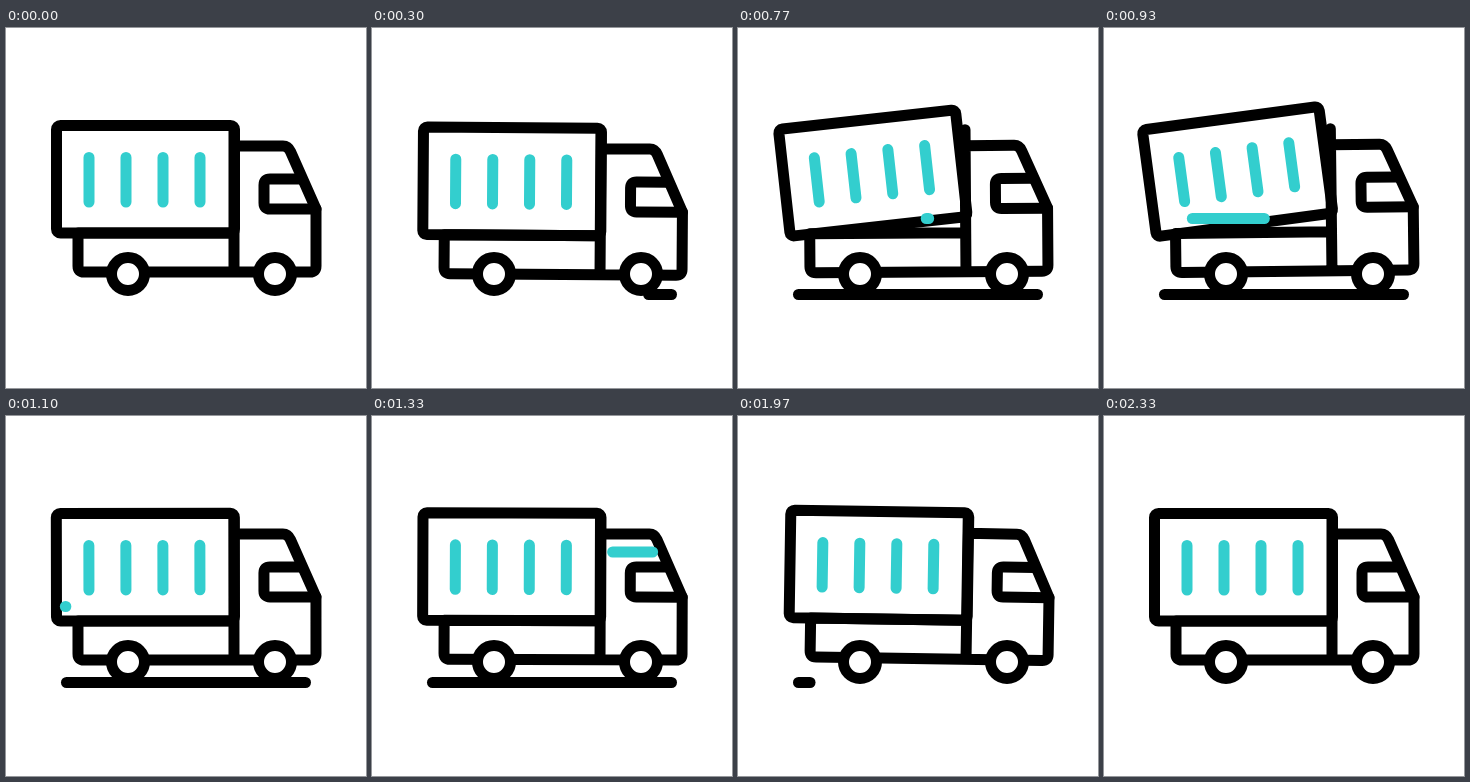
Animation of 360x360 px, one loop 2500 ms. Source, as an HTML page:

```html
<!DOCTYPE html>
<html lang="en">
<head>
<meta charset="utf-8">
<title>Delivery truck</title>
<style>
  html, body { margin: 0; width: 100%; height: 100%; overflow: hidden; background: #fff; }
  svg { display: block; width: 100vw; height: 100vh; }
  svg * { stroke-linecap: round; stroke-linejoin: round; }
  svg { fill: none; stroke: #000; stroke-width: 11; }
  .accent { stroke: #33cece; }
  .wheel { fill: #fff; }
</style>
</head>
<body>
<svg viewBox="0 0 360 360">
  <path id="ground"/>
  <g id="body">
    <path d="M228 102V244M72 205H228M72 205V238Q72 244 78 244H304Q310 244 310 238V181L284.500 123.500Q282 118 277 118H228"/>
    <path d="M295 151H264Q258 151 258 157V175Q258 181 264 181H310"/>
    <g id="box">
      <rect x="50.500" y="97.500" width="178" height="107.500" rx="4"/>
      <path class="accent" d="M83 129.500V174M120 129.500V174M157 129.500V174M194 129.500V174"/>
    </g>
  </g>
  <circle class="wheel" cx="122" cy="246" r="16.500"/>
  <circle class="wheel" cx="269" cy="246" r="16.500"/>
  <path id="wind" class="accent"/>
</svg>
<script>
const LOOP = 2500;
const REAR = 122, FRONT = 269, AXLE = 246;
const [ground, body, box, wind] =
  ['ground', 'body', 'box', 'wind'].map(id => document.getElementById(id));

// Suspension travel: time, rear offset, front offset
const bounce = [
  [0, 0, 0], [70, 0, 0], [320, 2, 3], [570, 1, 1], [930, 0, -1.7],
  [1130, 0, 0], [1230, 2, 4], [1330, -0.5, 0], [1530, 1, 3.5],
  [1730, 2.5, 4.2], [1970, -2.3, 0], [2170, 0, 2], [2330, 0, 0], [LOOP, 0, 0]
];

// Wind streaks: middle time, left end, right end, height
const streaks = [[930, 89, 161, 190.5], [1330, 241, 281, 136], [1730, 141, 170, 225.5]];

const ease = (t, start, end) => {
  const u = Math.min(1, Math.max(0, (t - start) / (end - start)));
  return u * u * (3 - 2 * u);
};
const mix = (a, b, k) => a + (b - a) * k;

// Grows from the right end, then shrinks towards the left end
const segment = (left, right, y, head, tail) => head - tail > 0.002
  ? `M${mix(right, left, tail)} ${y}H${mix(right, left, head)}` : '';

function draw(t) {
  const i = bounce.findIndex(key => key[0] > t);
  const from = bounce[i - 1], to = bounce[i];
  const k = ease(t, from[0], to[0]);
  const rear = mix(from[1], to[1], k), front = mix(from[2], to[2], k);
  const angle = Math.atan2(front - rear, FRONT - REAR) * 180 / Math.PI;
  body.setAttribute('transform', `translate(0 ${rear}) rotate(${angle} ${REAR} ${AXLE})`);

  const hop = Math.min(1, Math.max(0, (t - 610) / 505));
  box.setAttribute('transform', `rotate(${-8.4 * Math.sin(Math.PI * hop) ** 2} 75 186)`);

  ground.setAttribute('d', segment(60.5, 299.5, 266.5, ease(t, 232, 593), ease(t, 1658, 2019)));

  wind.setAttribute('d', streaks.map(([mid, left, right, y]) => {
    const pad = (right - left) * 0.15;
    const head = ease(t, mid - 180, mid + 80), tail = ease(t, mid - 80, mid + 180);
    // Both ends reach the listed places at the middle time
    const share = ease(80, -180, 80 + 180 - 260 + 80);
    const reach = ease(mid, mid - 180, mid + 80) * share;
    const span = (right - left) / (2 * reach - 1);
    const centre = (left + right) / 2;
    return segment(centre - span / 2, centre + span / 2, y, head, tail);
  }).join(''));
}

function tick(now) {
  draw(now % LOOP);
  requestAnimationFrame(tick);
}
draw(0);
requestAnimationFrame(tick);
</script>
</body>
</html>
```
